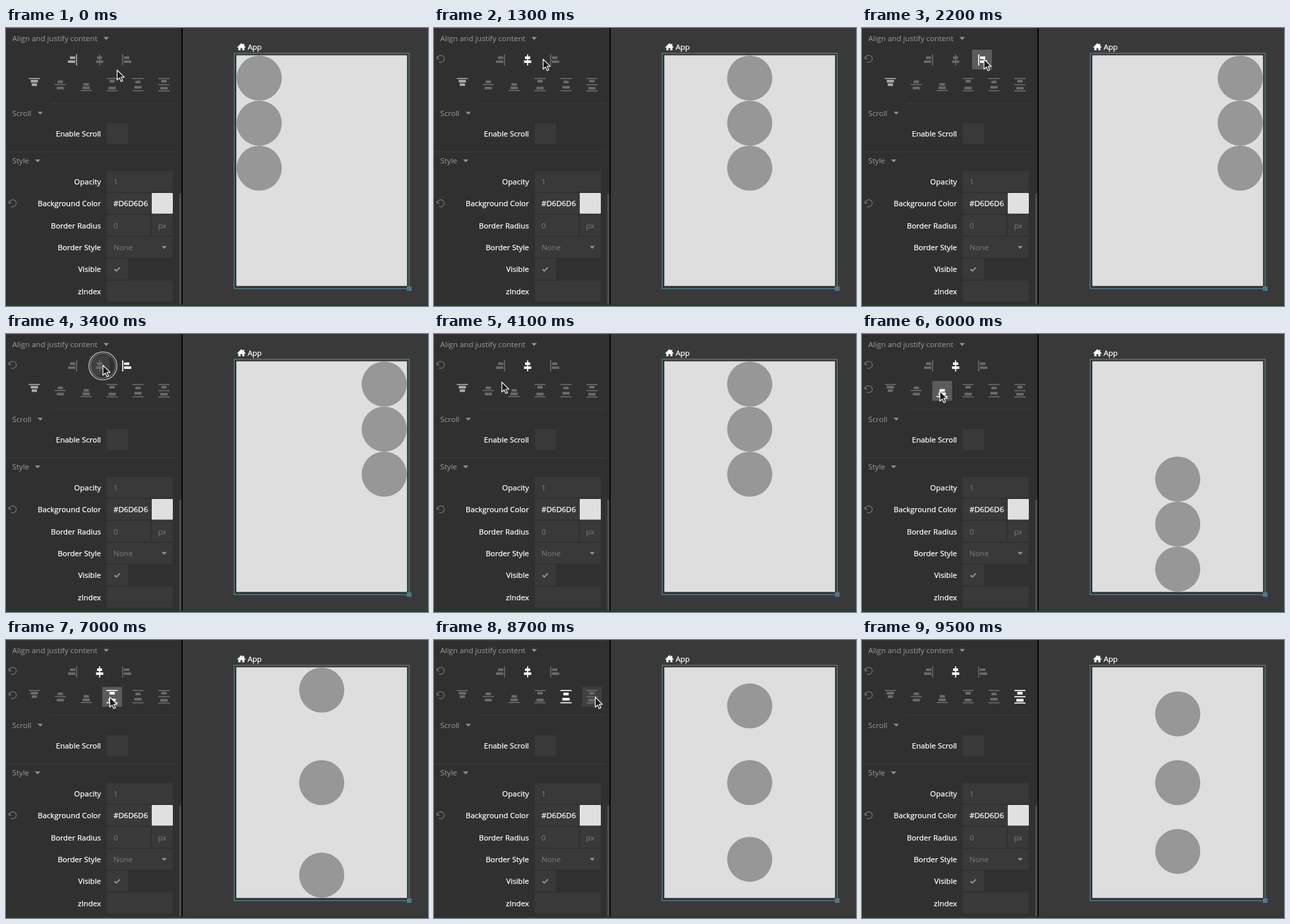
These frames come from a looping animation (640x423 px, 9.7 s). An HTML page:

```html
<!DOCTYPE html>
<html lang="en">
<head>
<meta charset="utf-8">
<title>Align and justify</title>
<style>
html, body { margin: 0; width: 100%; height: 100%; overflow: hidden; background: #393939; }
svg { display: block; width: 640px; height: 423px; }
text { font: 11.5px "Open Sans", sans-serif; }
.label, .lit { fill: #fff; stroke: #fff; stroke-width: .25; }
.label { text-anchor: end; }
.head { fill: #9b9b9b; }
.dim { fill: #7c7c7c; }
.field { fill: #393939; }
.caret { fill: #929292; }
.line { stroke: #3c3c3c; }
.reset { fill: none; stroke: #717171; stroke-width: 1.2; }
</style>
</head>
<body>
<svg viewBox="0 0 640 423">
  <rect width="640" height="423" fill="#393939"/>
  <rect width="266" height="423" fill="#303030"/>
  <rect x="266" width="2" height="423" fill="#080808"/>
  <rect x="262.5" y="252" width="3.5" height="169" rx="1.5" fill="#4b4b4b"/>
  <path class="line" d="M0 .5H260M68 114.5H260M0 188.5H260"/>
  <g id="panel"></g>
  <g id="buttons"></g>

  <path d="M350.5 29.2 357 23l2.6 2.5V24h1.7v3.1l2.2 2.1-.8.8-1.1-1v5h-3.2v-3.6h-2.8V34h-3.2v-5l-1.1 1Z" fill="#fff"/>
  <text class="lit" x="366.5" y="33.2">App</text>
  <rect x="347" y="40" width="263" height="355" fill="#303030"/>
  <rect x="346" y="38.5" width="265.5" height="358" fill="none" stroke="#507883" stroke-width="1.5"/>
  <rect x="349.3" y="41.5" width="258.9" height="351" fill="#dedede"/>
  <rect x="608" y="393" width="7" height="7" fill="#507883"/>
  <g id="discs" fill="#979797"></g>
  <rect y="421" width="640" height="2" fill="#0b5010"/>

  <g id="ripple" fill="none">
    <circle r="21.3" stroke="#d2d2d2" stroke-width="1.1"/>
    <circle r="18.7" stroke="#858585"/>
  </g>
  <path id="cursor" d="M0 0V15.2L3.6 11.9 6 17.4 8.6 16.3 6.2 10.9H11Z" fill="#1b1b1b" stroke="#f4f4f4" stroke-width="1.2" stroke-linejoin="round"/>
</svg>
<script>
const LOOP = 9700, STEP = 100, SIZE = 68.5, TOP = 42, HEIGHT = 350;
const $ = id => document.getElementById(id);
const show = (el, on) => el.style.display = on ? "" : "none";

function add(parent, tag, attrs, text) {
  const el = document.createElementNS("http://www.w3.org/2000/svg", tag);
  for (const k in attrs) el.setAttribute(k, attrs[k]);
  if (text) el.textContent = text;
  parent.append(el);
  return el;
}

// Panel
const panel = $("panel");
const say = (cls, x, y, text) => add(panel, "text", { class: cls, x, y: y + 4.2 }, text);
const box = (x, y, width) =>
  add(panel, "rect", { class: "field", x, y: y - 16, width, height: 31.7, rx: 1 });
const caret = (x, y) => add(panel, "path", { class: "caret", d: `M${x - 4} ${y - 2}h8l-4 4.4Z` });
const reset = y => add(panel, "path", {
  class: "reset",
  d: `M4.5 ${y - 4}v3.8h3.8M5 ${y - .6}A5.3 5.3 0 1 1 7.5 ${y + 4.4}`
});
const heading = (text, y, caretX) => { say("head", 9.5, y, text); caret(caretX, y); };
function field(label, y, width, value = "", cls = "dim") {
  say("label", 144, y, label);
  box(153, y, width);
  say(cls, 163, y, value);
}

heading("Align and justify content", 15.8, 152);
heading("Scroll", 129.4, 52);
heading("Style", 202, 48);
field("Enable Scroll", 160.8, 32);
const rowY = i => 233.5 + i * 33.4;
field("Opacity", rowY(0), 100, "1");
field("Background Color", rowY(1), 67, "#D6D6D6", "lit");
field("Border Radius", rowY(2), 66, "0");
field("Border Style", rowY(3), 100, "None");
field("Visible", rowY(4), 32);
field("zIndex", rowY(5), 100);
box(221, rowY(2), 32);
say("dim", 230.5, rowY(2), "px");
caret(240, rowY(3));
box(221, rowY(1), 32).style.fill = "#e0e0e0";
add(panel, "path", { d: "M164.5 367l2.8 2.8 5.4-5.6", fill: "none", stroke: "#8c8c8c", "stroke-width": 2.2 });
reset(rowY(1));
const resets = [47, 84].map(reset);

// Buttons
const rect = (g, x, y, width, height) => add(g, "rect", { x, y, width, height });

// A vertical rule with two bars: side 1 is right, 0 centre, -1 left
function drawAlign(g, side) {
  rect(g, side * 5 - .8, -8, 1.6, 17);
  [8, 11].forEach((w, i) => rect(g, side * 3 - w * (1 + side) / 2, i * 6 - 4.7, w, 3.8));
}

// Stacked from the top: r rule, b short bar, B long bar, dot gap
const PARTS = { r: [17, 1.6], b: [8, 4], B: [11, 4], ".": [0, 1.3] };
function drawStack(g, stack) {
  let y = -10.5;
  for (const c of stack) {
    const [w, h] = PARTS[c];
    if (w) rect(g, -w / 2, y, w, h);
    y += h;
  }
}

function makeButton(x, y, drawIcon, icon) {
  const g = add($("buttons"), "g", { transform: `translate(${x} ${y})` });
  const bg = rect(g, -15, -15, 30, 30);
  const mark = add(g, "g", {});
  drawIcon(mark, icon);
  return { x, y, bg, mark };
}
const rows = [
  [1, 0, -1].map((side, i) => makeButton(102 + 40 * i, 48, drawAlign, side)),
  ["r.B.b", "...b.r..B", "......b.B.r", "r.b.....B.r", "r..b...B..r", "r.b..r..B.r"]
    .map((stack, i) => makeButton(43 + 39.3 * i, 86.5, drawStack, stack))
];
const discs = [0, 1, 2].map(() => add($("discs"), "circle", { r: SIZE / 2 }));

// Each click: time, row, choice, and where on the button the pointer rests
const clicks = [
  [700, 0, 1, 4], [2000, 0, 2, 3], [3500, 0, 1, 5], [4700, 1, 1],
  [5800, 1, 2], [6800, 1, 3], [7900, 1, 4], [9000, 1, 5, 5]
].map(([at, row, pick, dx = -3.5]) => {
  const b = rows[row][pick];
  return { at, row, pick, x: b.x + dx, y: b.y + row - .5 };
});
const start = { at: -300, x: 168.5, y: 64 };

// The pointer rests 300 ms after a click and arrives 400 ms before the next
function cursorAt(t) {
  const i = clicks.findIndex(c => t < c.at);
  if (i < 0) return clicks[clicks.length - 1];
  const a = clicks[i - 1] || start, b = clicks[i];
  const from = a.at + 300, to = b.at - 400;
  const u = Math.max(0, Math.min(1, (t - from) / (to - from)));
  const e = u * u * (3 - 2 * u);
  return { x: a.x + (b.x - a.x) * e, y: a.y + (b.y - a.y) * e };
}

// Shares of the spare height before the first disc and between discs:
// start, center, end, then space-between, -around, -evenly
function spread(pick) {
  if (pick < 3) return [pick / 2, 0];
  const edge = (pick - 3) / 2, gap = 1 / (2 + 2 * edge);
  return [edge * gap, gap];
}

function draw(t) {
  const done = clicks.filter(c => t >= c.at);
  const last = done[done.length - 1];
  const state = [0, 1].map(r => done.filter(c => c.row === r).pop());
  const picks = state.map(c => c ? c.pick : 0);
  const { x, y } = cursorAt(t), visible = t < 9400;

  rows.forEach((row, r) => {
    show(resets[r], state[r]);
    row.forEach((b, i) => {
      const hover = visible && Math.abs(x - b.x) < 15 && Math.abs(y - b.y) < 15;
      const fresh = last && last.row === r && last.pick === i;
      b.bg.setAttribute("fill", !hover ? "none" : fresh ? "#5c5c5c" : "#3f3f3f");
      b.mark.setAttribute("fill", picks[r] !== i ? "#6a6a6a" : state[r] ? "#fff" : "#a9a9a9");
    });
  });

  const spare = HEIGHT - 3 * SIZE, [lead, gap] = spread(picks[1]);
  discs.forEach((d, i) => {
    d.setAttribute("cx", 384 + 94.8 * picks[0]);
    d.setAttribute("cy", TOP + SIZE * (i + .5) + spare * (lead + i * gap));
  });

  const press = clicks.find(c => Math.abs(t - c.at) < 200);
  show($("ripple"), press);
  if (press) {
    const age = t - press.at + 200;
    $("ripple").setAttribute("transform", `translate(${x} ${y + 1}) scale(${Math.min(1, .7 + age / 333)})`);
    $("ripple").setAttribute("opacity", Math.min(1, (400 - age) / 200));
  }
  show($("cursor"), visible);
  $("cursor").setAttribute("transform", `translate(${x} ${y})`);
}

function tick() {
  const t = performance.now() % LOOP;
  draw(Math.floor(t / STEP) * STEP);
  requestAnimationFrame(tick);
}
tick();
</script>
</body>
</html>
```
